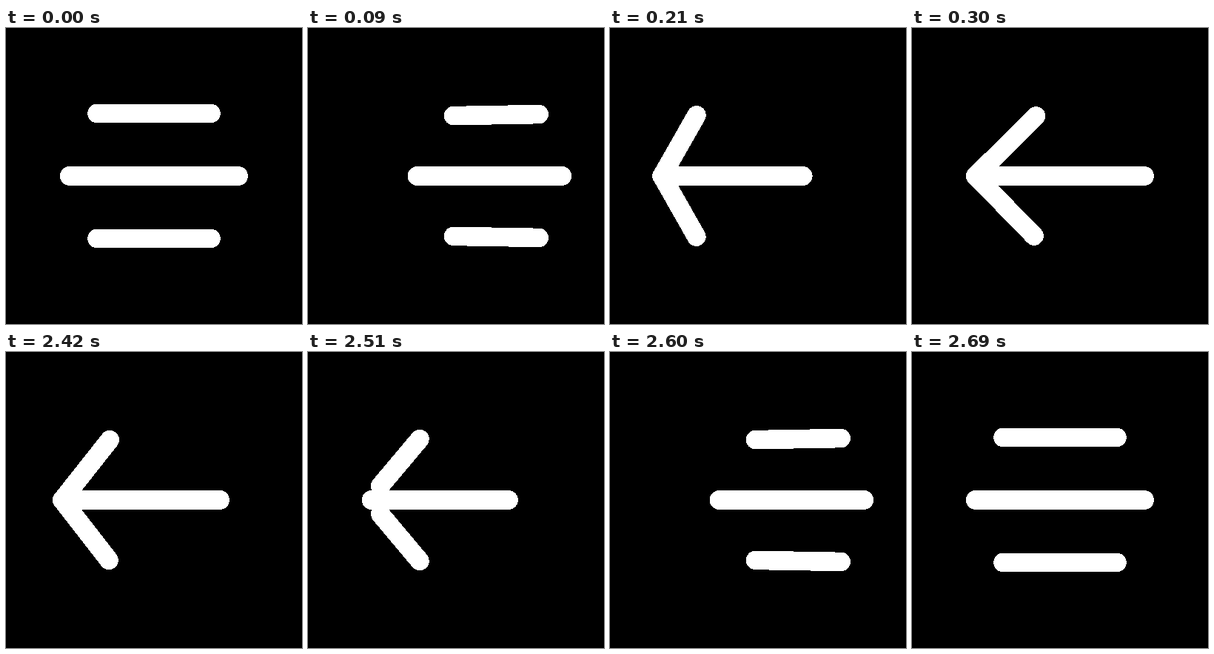
An HTML page that plays this animation: 400 px wide and 400 px high, repeating every 4220 ms.

```html
<!DOCTYPE html>
<html lang="en">
<head>
<meta charset="utf-8">
<title>Menu to arrow</title>
<style>
  html, body { margin: 0; width: 100%; height: 100%; overflow: hidden; background: #000; }
  svg { display: block; width: 100%; height: 100%; shape-rendering: crispEdges; }
  line { stroke: #fff; stroke-width: 25.6; stroke-linecap: round; }
  #mid { stroke-width: 26; }
</style>
</head>
<body>
<svg viewBox="0 0 400 400">
  <line id="upper"/>
  <line id="mid"/>
  <line id="lower"/>
</svg>
<script>
  const LOOP = 4220, STEP = 30, STEPS = 10, BACK = 2420;

  const [upper, mid, lower] = ["upper", "mid", "lower"].map(id => document.getElementById(id));

  const mix = (a, b, f) => a + (b - a) * f;

  function smooth(from, to, p) {
    const s = Math.min(1, Math.max(0, (p - from) / (to - from)));
    return s * s * (3 - 2 * s);
  }

  // Sine with the given number of half turns; bend > 1 makes it start later.
  const wave = (p, halves, bend) => Math.sin(halves * Math.PI * p ** bend);

  function place(bar, x1, y1, x2, y2) {
    const attrs = { x1, y1, x2, y2 };
    for (const name in attrs) bar.setAttribute(name, attrs[name]);
  }

  // 0 is the menu, 1 is the arrow; the change advances in even steps.
  function progress(t) {
    const done = t < BACK
      ? Math.floor(t / STEP)
      : STEPS - 1 - Math.floor((t - BACK) / STEP);
    return Math.min(STEPS, Math.max(0, done)) / STEPS;
  }

  function draw(t) {
    const p = progress(t);

    // The group swings right, then left, while the bars shrink and recover.
    const centre = 200 + 49 * (1 - p * p / 2) * wave(p, 2, 1.03);
    const length = 228 - 44 * wave(p, 1, 1.1);
    const left = centre - length / 2;
    place(mid, left, 200, left + length, 200);

    // Outer bars fold their left ends onto the tip.
    const fold = smooth(0.24, 0.76, p);
    const x1 = left + (1 - fold) * (37 + 17 * wave(p, 1, 1));
    const x2 = left + mix(191, 81.5, fold) - 41 * wave(p, 1, 1.4);
    const y1 = mix(115.5, 200, fold);
    const y2 = mix(115.5, 119, p);
    place(upper, x1, y1, x2, y2);
    place(lower, x1, 400 - y1, x2 - 2.5 * p ** 8, 400 - y2);
  }

  const start = performance.now();
  function tick() {
    draw((performance.now() - start) % LOOP);
    requestAnimationFrame(tick);
  }
  tick();
</script>
</body>
</html>
```
